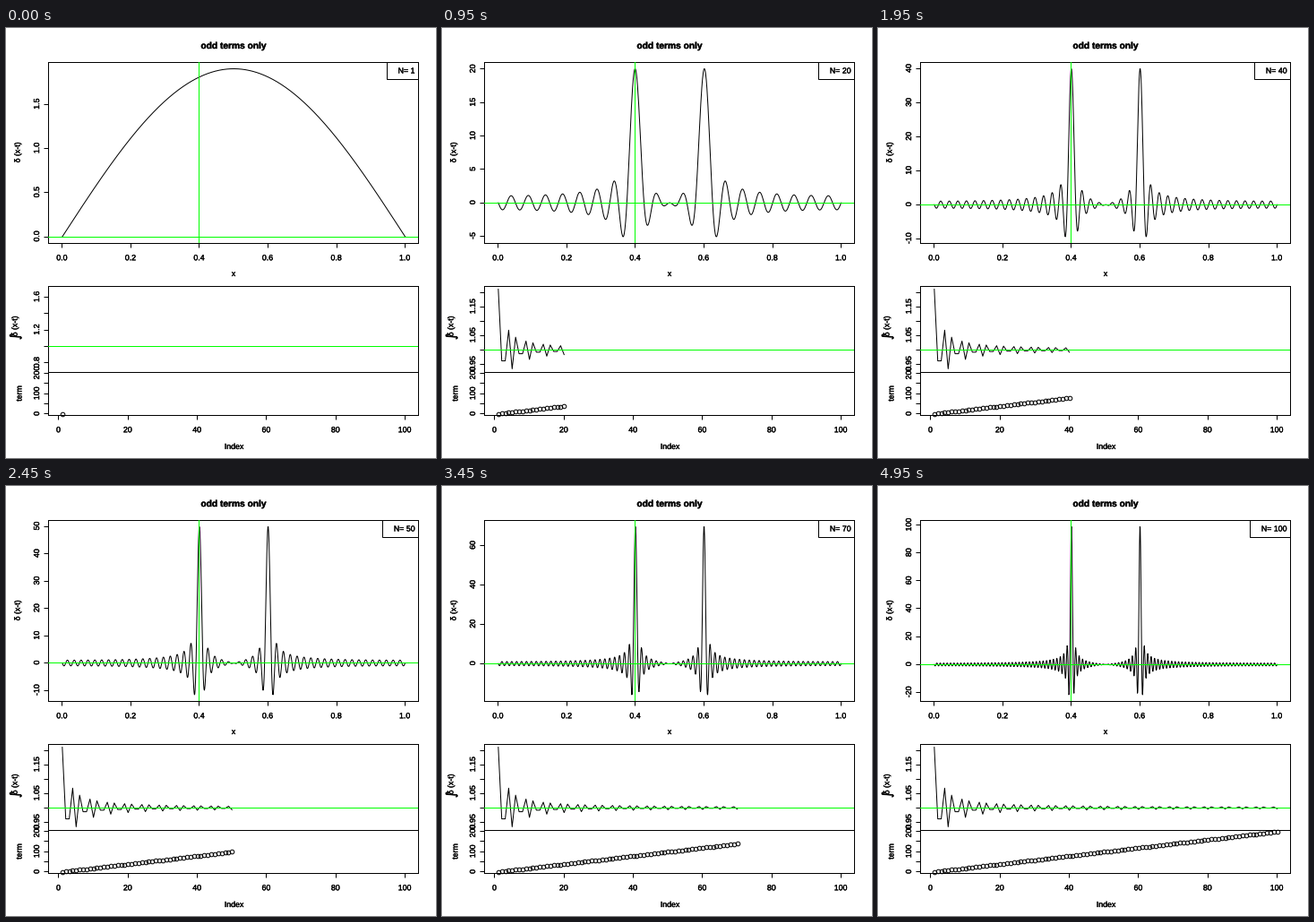
A matplotlib script for the animation above (5000 ms loop, 480 by 480 pixels).

```python
import math

import numpy as np
import matplotlib.pyplot as plt
from matplotlib.animation import FuncAnimation
from matplotlib.patches import Rectangle
from matplotlib.patheffects import withStroke
from matplotlib.transforms import ScaledTranslation

SIZE = 480
TERMS = 100
T = 0.4
FONT = 8.8
GREEN = "#00ff00"
LEFT, RIGHT = 47.52, 460.9
# Straight lines snap to whole pixels; this makes them round down.
NUDGE = 0.48
HEAVY = [withStroke(linewidth=0.35, foreground="black")]

plt.rcParams.update({
    "font.family": "Liberation Sans",
    "font.size": FONT,
    "axes.linewidth": 1,
    "lines.linewidth": 1,
})

# At 72 dpi one point equals one pixel.
fig = plt.figure(figsize=(SIZE / 72, SIZE / 72), dpi=72, facecolor="white")
unsnap = ScaledTranslation(NUDGE / 72, -NUDGE / 72, fig.dpi_scale_trans)


def panel(top, bottom, xlim, xticks=()):
    """Axes whose box is given in pixels from the top left corner."""
    ax = fig.add_axes([(LEFT - NUDGE) / SIZE, 1 - (bottom - NUDGE) / SIZE,
                       (RIGHT - LEFT) / SIZE, (bottom - top) / SIZE])
    ax.set_xlim(*padded(*xlim))
    ax.set_xticks(xticks)
    ax.tick_params(length=5, width=1)
    ax.tick_params(axis="x", pad=7.3)
    ax.tick_params(axis="y", pad=3, labelrotation=90)
    plt.setp(ax.get_xticklabels(), path_effects=HEAVY)
    ax.box_height = bottom - top
    return ax


def padded(lo, hi):
    """Widen a range by 4 % at both ends; a single value gets 40 % first."""
    if hi == lo:
        lo, hi = lo - 0.4 * abs(lo), hi + 0.4 * abs(hi)
    pad = 0.04 * (hi - lo)
    return lo - pad, hi + pad


def tick_step(lo, hi):
    """Round step (1, 2 or 5 times a power of ten) for about five cells."""
    cell = (hi - lo) / 5
    base = 10 ** math.floor(math.log10(cell))
    step = base
    for factor, bias in ((2, 0.8), (5, 1.7), (10, 0.8)):
        if factor * base - cell < bias * (cell - step):
            step = factor * base
    return step


def text_width(s):
    ems = {".": 0.278, "-": 0.333}
    return FONT * sum(ems.get(c, 0.556) for c in s)


def scale_y(ax, lo, hi):
    """Set limits and ticks, leaving out labels that would crowd."""
    lo, hi = padded(lo, hi)
    step = tick_step(lo, hi)
    digits = max(0, -math.floor(math.log10(step) + 1e-9))
    ticks = [k * step for k in range(math.ceil(lo / step - 1e-9),
                                     math.floor(hi / step + 1e-9) + 1)]
    labels, edge = [], -math.inf
    for tick in ticks:
        label = f"{tick:.{digits}f}"
        pos = (tick - lo) / (hi - lo) * ax.box_height
        half = text_width(label) / 2
        if pos - half > edge + 7:
            edge = pos + half
        else:
            label = ""
        labels.append(label)
    ax.set_yticks(ticks, labels)
    ax.set_ylim(lo, hi)
    plt.setp(ax.get_yticklabels(), va="center", ha="right",
             path_effects=HEAVY)


def add_curve(ax, *style, **options):
    line, = ax.plot([], [], *style, color="black", snap=False,
                    transform=unsnapped(ax), **options)
    return line


def unsnapped(ax):
    return ax.transData + unsnap


x = np.linspace(0, 1, 1000)
index = np.arange(1, TERMS + 1)
odd = 2 * index - 1
weights = 2 * np.sin(odd * np.pi * T)
partial = np.cumsum(weights[:, None] * np.sin(np.pi * np.outer(odd, x)), axis=0)
integral = np.cumsum(weights * 2 / (odd * np.pi))

delta_ax = panel(38.02, 240.48, (0, 1), np.linspace(0, 1, 6))
integral_ax = panel(288, 384, (1, TERMS))
term_ax = panel(384, 432.48, (1, TERMS), range(0, 101, 20))
scale_y(term_ax, odd[0], odd[-1])

curve = add_curve(delta_ax)
delta_ax.axhline(0, color=GREEN, zorder=3)
delta_ax.axvline(T, color=GREEN, zorder=3)
trace = add_curve(integral_ax)
integral_ax.axhline(1, color=GREEN, zorder=3)
dots = add_curve(term_ax, "o", ms=4.6, mfc="none", mew=1, clip_on=False)

# Pixel-space overlay for titles and the legend.
stage = fig.add_axes([0, 0, 1, 1])
stage.set(xlim=(0, SIZE), ylim=(SIZE, 0))
stage.axis("off")


def write(px, py, s, **style):
    options = dict(ha="center", va="baseline", rotation_mode="anchor",
                   path_effects=HEAVY)
    return stage.text(px, py, s, **{**options, **style})


write(254.5, 23, "odd terms only", size=10.2, weight="bold")
write(254, 277, "x")
write(254.5, 470, "Index")
write(15.5, 139, "δ (x-t)", rotation=90)
write(12.5, 333, "δ (x-t)", rotation=90)
write(14.5, 344.5, "∫", rotation=90, size=14, family="DejaVu Sans")
write(17.5, 408, "term", rotation=90)

legend_box = stage.add_patch(
    Rectangle((0, 38), 0, 19, facecolor="white", edgecolor="black", lw=1,
              zorder=2))
legend_text = write(456.5, 50.5, "", ha="right")


def draw(frame):
    n = frame + 1
    y = partial[frame]
    curve.set_data(x, y)
    scale_y(delta_ax, y.min(), y.max())

    sums = integral[:n]
    trace.set_data(index[:n], sums)
    scale_y(integral_ax, sums.min(), sums.max())
    dots.set_data(index[:n], odd[:n])

    left = 430 - 5 * len(str(n))
    legend_box.set_x(left)
    legend_box.set_width(460 - left)
    legend_text.set_text(f"N= {n}")
    return curve, trace, dots, legend_box, legend_text


anim = FuncAnimation(fig, draw, frames=TERMS, interval=50, repeat=True)
plt.show()
```
